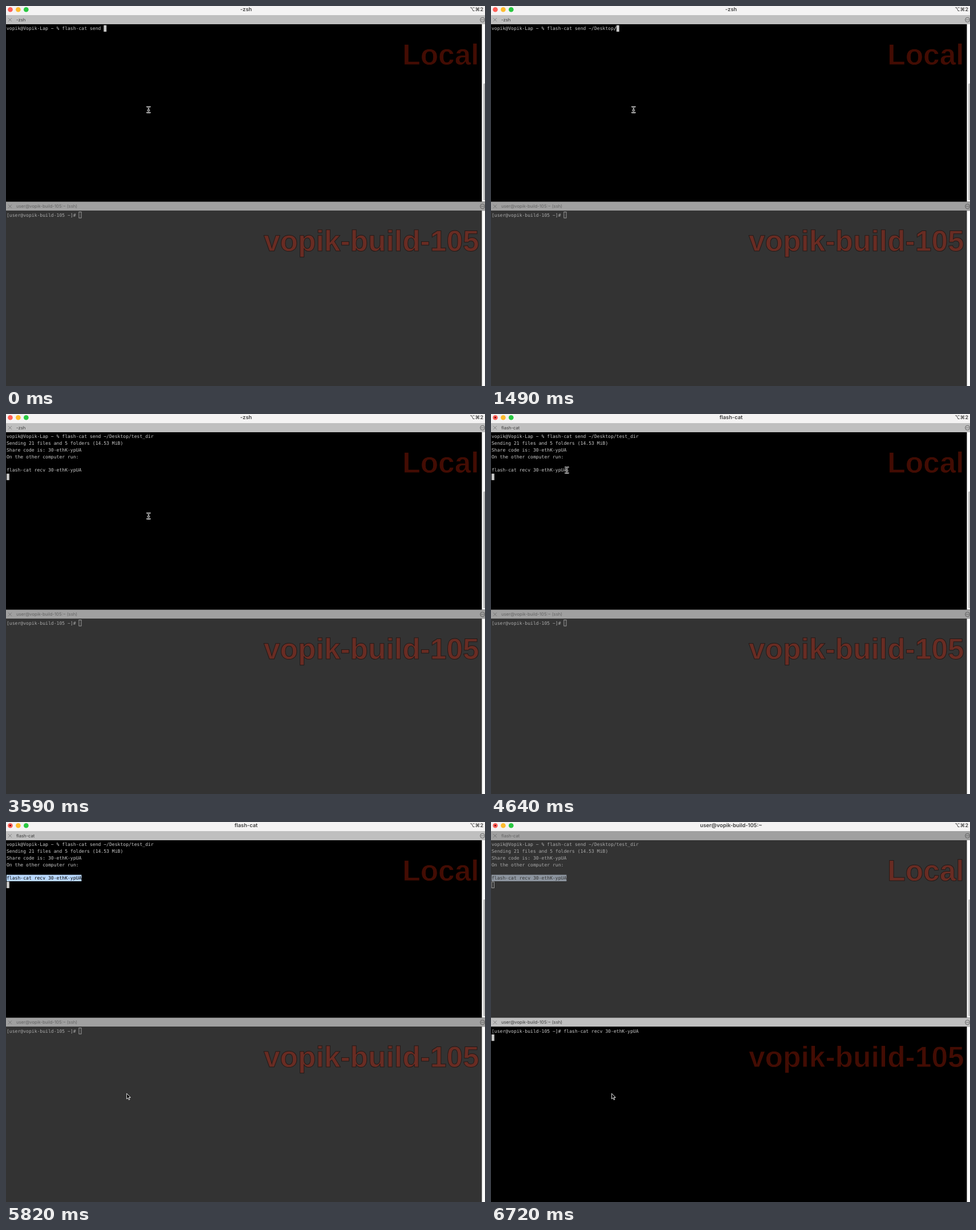
These frames come from a looping animation (840 px wide and 667 px high, 8000 ms). An HTML page:

```html
<!DOCTYPE html>
<html lang="en">
<head>
<meta charset="utf-8">
<title>Terminal</title>
<style>
  html, body { margin: 0; width: 100%; height: 100%; overflow: hidden; background: #000; }
  svg { display: block; width: 840px; height: 667px; }
  text { white-space: pre; text-rendering: geometricPrecision; }
  .mono { font: 8.085px "DejaVu Sans Mono", monospace; }
  .bold { font-weight: 700; }
  .title { font: 600 9.3px Inter, sans-serif; fill: #3d3d3d; text-anchor: middle; }
  .tab { font: 7.65px Inter, sans-serif; }
  .key { font: 600 9px Inter, "DejaVu Sans", sans-serif; fill: #404040; text-anchor: end; }
  .badge { font: 700 51.5px "Liberation Sans", Arial, sans-serif; text-anchor: end; }
</style>
</head>
<body>
<svg id="stage" viewBox="0 0 840 667"></svg>
<script>
const LOOP = 8000;
const COL = 4.867, ROW = 11.83, LEFT = 1;
const HOST = 'user@vopik-build-105';
const PROMPT = 'vopik@Vopik-Lap ~ % flash-cat send ';
const REMOTE = `[${HOST} ~]# `;
const RECV = 'flash-cat recv 30-ethK-ypUA';
const OUTPUT = [
  'Sending 21 files and 5 folders (14.53 MiB)',
  'Share code is: 30-ethK-ypUA',
  'On the other computer run:',
  '',
  RECV,
  ''
];

// Each step changes part of the state at its time.
const base = {
  typed: '', slash: false, sent: false, title: '-zsh', tab: '-zsh', busy: false,
  mouse: [250, 182], arrow: false, selectFrom: RECV.length, remote: false,
  lower: [REMOTE]
};
const steps = [
  [0, {}],
  [300, { typed: '~' }],
  [740, { typed: '~/' }],
  [1040, { typed: '~/D' }],
  [1190, { typed: '~/De' }],
  [1340, { typed: '~/Des' }],
  [1490, { typed: '~/Desktop', slash: true }],
  [1940, { typed: '~/Desktop/t', slash: false }],
  [2390, { typed: '~/Desktop/' }],
  [2690, { typed: '~/Desktop/test_dir', slash: true }],
  [2990, { slash: false, sent: true }],
  [3590, { mouse: [250, 179] }],
  [3740, { mouse: [237, 169], title: 'flash-cat', tab: 'flash-cat', busy: true }],
  [3890, { mouse: [207, 147] }],
  [4040, { mouse: [174, 123] }],
  [4190, { mouse: [150, 106] }],
  [4340, { mouse: [138, 99] }],
  [4640, { mouse: [133, 98.5] }],
  [4790, { mouse: [113, 98.5], selectFrom: 23 }],
  [4940, { mouse: [69, 98.5], selectFrom: 14 }],
  [5090, { mouse: [25, 98.5], selectFrom: 5 }],
  [5240, { mouse: [4, 98.5], selectFrom: 0 }],
  [5370, { mouse: [39, 165] }],
  [5520, { mouse: [143, 353], arrow: true }],
  [5670, { mouse: [202.7, 460.7] }],
  [5820, { mouse: [211.7, 476.5] }],
  [6120, { remote: true, title: HOST + ':~' }],
  [6420, { lower: [REMOTE + RECV] }],
  [6720, { lower: [REMOTE + RECV, ''] }]
];
let last = base;
const states = steps.map(([, change]) => last = { ...last, ...change });

const colX = c => LEFT + c * COL;
const rect = (x, y, w, h, fill, more = '') =>
  `<rect x="${x}" y="${y}" width="${w}" height="${h}" fill="${fill}" ${more}/>`;
const dot = (x, y, r, fill) => `<circle cx="${x}" cy="${y}" r="${r}" fill="${fill}"/>`;
const label = (cls, x, y, str, more = '') =>
  `<text class="${cls}" x="${x}" y="${y}" ${more}>${str}</text>`;

function titleBar(s) {
  return rect(0, 0, 840, 16, '#f4f3f3') +
    dot(7.5, 6.2, 4.3, '#ff5f57') + dot(21.4, 6.2, 4.3, '#febc2e') + dot(35.3, 6.2, 4.3, '#28c840') +
    (s.busy ? dot(7.5, 6.2, 1.4, '#5c0a06') : '') +
    label('title', 421, 9.2, s.title) +
    label('key', 822.5, 8.8, '⌥') + label('key', 831.3, 8.8, '⌘') + label('key', 837.2, 8.8, '2');
}

function header(y, name, active) {
  const ink = active ? '#3a3a3a' : '#626262';
  const line = active ? '#7c7c7c' : '#707070';
  const mid = y + 8.2;
  return rect(0, y, 840, 16, active ? '#bfbfbf' : '#a0a0a0') +
    `<path d="M4 ${mid - 3}l6 6m0-6l-6 6" stroke="${line}" stroke-width=".9"/>` +
    label('tab', 18, mid + 2.7, name, `fill="${ink}"`) +
    `<circle cx="835.6" cy="${mid}" r="4" fill="none" stroke="#505050" stroke-width=".8"/>` +
    [-2, 0, 2].map(d => dot(835.6 + d, mid, .65, '#505050')).join('');
}

function cursor(c, top, active) {
  return active
    ? rect(colX(c), top + .4, COL, ROW - .4, '#c7c7c7')
    : rect(colX(c) + .4, top + .8, COL - .8, ROW - 1.2, 'none', 'stroke="#b4b4b4" stroke-width=".8"');
}

function pane(y, h, badge, lines, active, selectFrom = RECV.length, slash = false) {
  const ink = active ? '#c9c9c9' : '#a9a9a9';
  const top = r => y + 1.3 + r * ROW;
  const baseY = r => top(r) + 8.9;
  const end = lines.length - 1;
  let out = rect(0, y, 834.5, h, active ? '#000' : '#333') + rect(834.5, y, 5.5, h, '#fafafa');
  out += label('badge', 829.7, y + 70.5, badge, active
    ? 'fill="#430c03" stroke="#000" stroke-width=".8"'
    : 'fill="#692c23" stroke="#231a18" stroke-width="1"');
  lines.forEach((str, r) => out += label('mono', LEFT, baseY(r), str, `fill="${ink}"`));
  if (selectFrom < RECV.length) {
    const x = colX(selectFrom);
    out += rect(x, top(5) + .2, colX(RECV.length) - x, ROW - .5, active ? '#b9d8fd' : '#8d959f') +
      label('mono', x, baseY(5), RECV.slice(selectFrom), `fill="${active ? '#000' : '#333'}"`);
  }
  let col = lines[end].length;
  if (slash) out += label('mono bold', colX(col++), baseY(end), '/', 'fill="#fff"');
  return out + cursor(col, top(end), active);
}

function pointer([x, y], arrow) {
  const place = `transform="translate(${x} ${y})"`;
  if (arrow) {
    return `<path ${place} d="M0 0V9.6L2.2 7.6L3.7 11.2L5.3 10.5L3.8 7H6.7Z"
      fill="#000" stroke="#fff" stroke-width=".9" stroke-linejoin="round"/>`;
  }
  const beam = 'M-2.6-5.2Q0-5.2 0-3.7V3.7Q0 5.2-2.6 5.2M2.6-5.2Q0-5.2 0-3.7M0 3.7Q0 5.2 2.6 5.2M-1.3 1.2H1.3';
  return `<g ${place} fill="none" stroke-linecap="round">
    <path d="${beam}" stroke="#fff" stroke-width="2.3"/>
    <path d="${beam}" stroke="#000" stroke-width=".8"/></g>`;
}

function scene(s) {
  const upper = [PROMPT + s.typed, ...(s.sent ? OUTPUT : [])];
  return titleBar(s) +
    header(16, s.tab, !s.remote) +
    pane(32, 311.5, 'Local', upper, !s.remote, s.selectFrom, s.slash) +
    rect(837, 136, 4, 205, '#c1c1c1', 'rx="1.5"') +
    header(343.5, HOST + ':~ (ssh)', s.remote) +
    pane(359.3, 307.7, 'vopik-build-105', s.lower, s.remote) +
    pointer(s.mouse, s.arrow);
}

const stage = document.getElementById('stage');
const start = performance.now();
let shown = -1;

function draw() {
  const t = (performance.now() - start) % LOOP;
  const i = steps.findLastIndex(([at]) => at <= t);
  if (i !== shown) {
    stage.innerHTML = scene(states[i]);
    shown = i;
  }
  requestAnimationFrame(draw);
}
draw();
</script>
</body>
</html>
```
